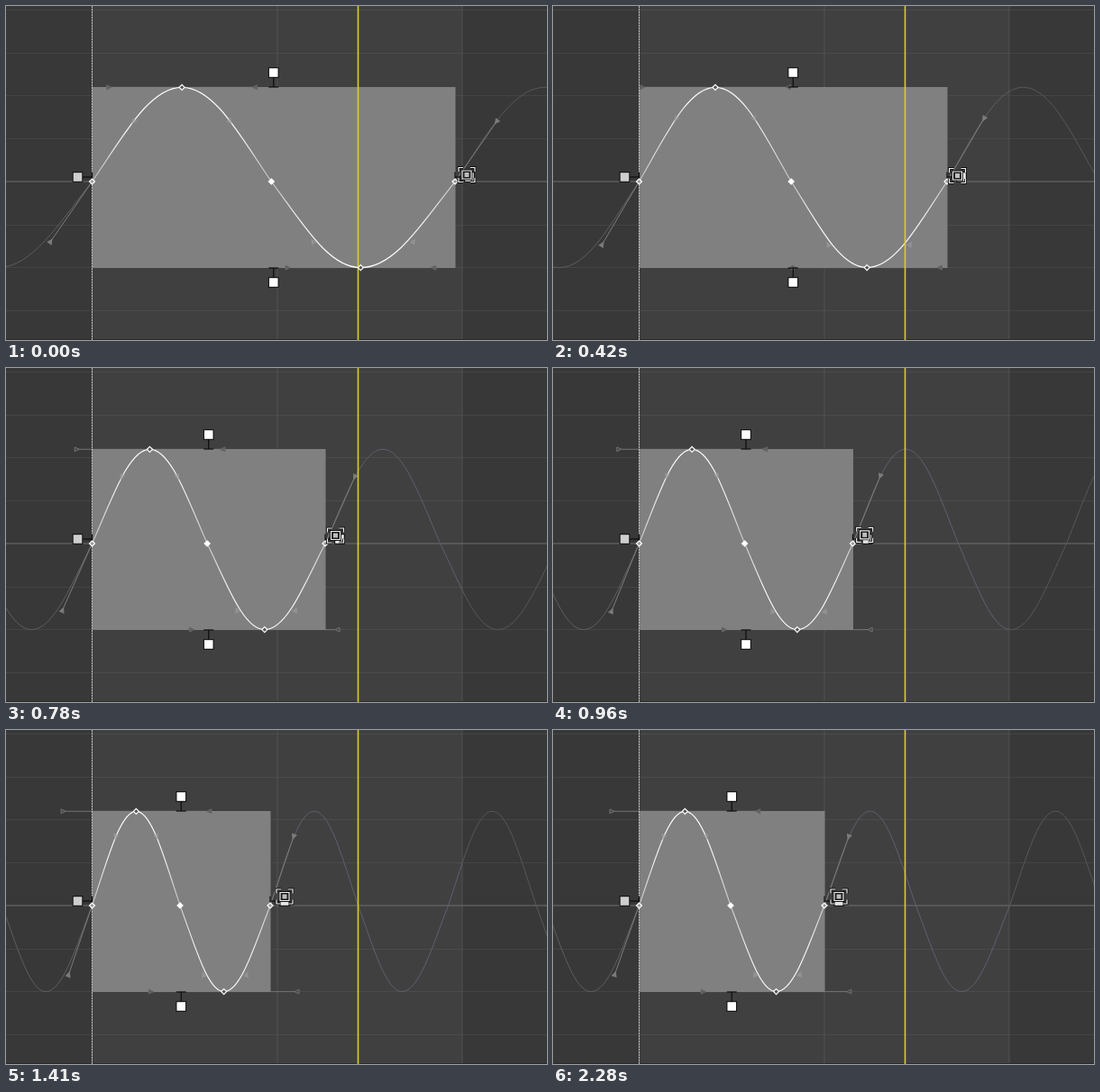
Recreate the animation shown at these times as an HTML page with a canvas. Size 600 by 371 pixels, loop 2.37 s.

```html
<!DOCTYPE html>
<html lang="en">
<head>
<meta charset="utf-8">
<title>Curve editor: scaling a cycle</title>
<style>
  html, body { margin: 0; width: 100%; height: 100%; overflow: hidden; background: #383838; }
  canvas { display: block; }
</style>
</head>
<body>
<canvas id="stage" width="600" height="371"></canvas>
<script>
const c = document.getElementById('stage').getContext('2d');
const LOOP = 2370, LEFT = 95.5, MID = 195, TOP = 90.3, LOW = 290.6, REACH = 81;

// Keys: [ms, right edge of the box, pointer x, pointer y]
const keys = [
  [0, 498, 511, 187.5], [420, 437, 448.5, 188.5], [780, 354, 365.5, 186],
  [1170, 313, 328, 185], [1410, 293, 309, 185], [1740, 293, 309, 185],
  [1950, 301, 316, 185], [2100, 301, 317, 185], [LOOP, 301, 317, 185]
];

// Monotone cubic interpolation through column k
function track(t, k) {
  const secant = i => (keys[i + 1][k] - keys[i][k]) / (keys[i + 1][0] - keys[i][0]);
  const slope = i => {
    if (i === 0) return secant(0);
    if (i === keys.length - 1) return 0;
    const a = secant(i - 1), b = secant(i);
    return a * b > 0 ? 2 * a * b / (a + b) : 0;
  };
  let i = 0;
  while (i < keys.length - 2 && t >= keys[i + 1][0]) i++;
  const h = keys[i + 1][0] - keys[i][0], u = (t - keys[i][0]) / h, v = 1 - u;
  return keys[i][k] * (1 + 2 * u) * v * v + slope(i) * h * u * v * v
       + keys[i + 1][k] * u * u * (3 - 2 * u) - slope(i + 1) * h * u * u * v;
}

function rect(color, x, y, w, h) {
  c.fillStyle = color;
  c.fillRect(x, y, w, h);
}

function line(color, x1, y1, x2, y2, width = 1) {
  c.strokeStyle = color;
  c.lineWidth = width;
  c.beginPath();
  c.moveTo(x1, y1);
  c.lineTo(x2, y2);
  c.stroke();
}

function clipped(x, w, draw) {
  c.save();
  c.beginPath();
  c.rect(x, 0, w, 371);
  c.clip();
  draw();
  c.restore();
}

// One cycle of the wave, w wide, starting at x
function points(x, w) {
  return [[x, MID], [x + 0.2475 * w, TOP], [x + 0.494 * w, MID], [x + 0.74 * w, LOW], [x + w, MID]];
}

function wave(color, x, w, width) {
  const p = points(x, w);
  c.beginPath();
  c.moveTo(...p[0]);
  for (let i = 1; i < 5; i++) {
    const [x1, y1] = p[i - 1], [x2, y2] = p[i], d = x2 - x1, rise = (y2 - y1) * 0.5;
    const outward = i % 2;
    c.bezierCurveTo(x1 + 0.36 * d, outward ? y1 + rise : y1,
                    x2 - 0.36 * d, outward ? y2 : y2 - rise, x2, y2);
  }
  c.strokeStyle = color;
  c.lineWidth = width;
  c.stroke();
}

// White at the extremes, paler around the middle keys
const glow = c.createLinearGradient(0, TOP, 0, LOW);
[[0, 1], [0.25, 0.9], [0.5, 0.55], [0.75, 0.9], [1, 1]]
  .forEach(([at, alpha]) => glow.addColorStop(at, `rgba(255,255,255,${alpha})`));

// Small arrow at the end of a tangent, aimed back at its key
function arrow(x, y, dx, dy, color, fill) {
  c.save();
  c.translate(x + dx, y + dy);
  c.rotate(Math.atan2(-dy, -dx));
  c.beginPath();
  c.moveTo(2.7, 0);
  c.lineTo(-2.3, -2.4);
  c.lineTo(-2.3, 2.4);
  c.closePath();
  c.fillStyle = fill;
  c.fill();
  c.strokeStyle = color;
  c.lineWidth = 1;
  c.stroke();
  c.restore();
}

// Tangent lines show only outside the box; arrows show on both sides
function tangents(p, w, outside) {
  const k = 582 / w, dx = REACH / Math.hypot(1, k), dy = dx * k;
  const steep = outside ? '#7c7c7c' : 'rgba(155,155,155,.6)';
  const flat = outside ? '#737373' : '#626262';
  p.forEach(([x, y], i) => {
    for (const s of [-1, 1]) {
      const level = i % 2;
      const ex = s * (level ? REACH : dx), ey = level ? 0 : (i === 2 ? s : -s) * dy;
      const color = level ? flat : steep;
      if (outside) line(color, x, y, x + ex, y + ey);
      arrow(x, y, ex, ey, color, level && outside ? '#454545' : color);
    }
  });
}

function diamond(x, y, fill) {
  c.beginPath();
  c.moveTo(x, y - 3);
  c.lineTo(x + 3, y);
  c.lineTo(x, y + 3);
  c.lineTo(x - 3, y);
  c.closePath();
  c.fillStyle = fill;
  c.fill();
  c.strokeStyle = '#fff';
  c.lineWidth = 1.2;
  c.stroke();
}

// Scale grip: end bar on the box edge, stem and square
function grip(x, y, dx, dy, fill) {
  line('#0c0c0c', x - 5.5 * dy, y - 5.5 * dx, x + 5.5 * dy, y + 5.5 * dx, 1.2);
  line('#0c0c0c', x, y, x + 11 * dx, y + 11 * dy, 1.2);
  const gx = x + 16 * dx, gy = y + 16 * dy;
  rect('#0c0c0c', gx - 5.8, gy - 5.8, 11.6, 11.6);
  rect(fill, gx - 4.8, gy - 4.8, 9.6, 9.6);
}

function pointer(x, y) {
  const shape = () => {
    c.beginPath();
    for (const sx of [-1, 1]) for (const sy of [-1, 1]) {
      c.moveTo(x + sx * 4, y + sy * 8);
      c.lineTo(x + sx * 9, y + sy * 8);
      c.lineTo(x + sx * 9, y + sy * 3.5);
    }
    c.rect(x - 5, y - 4.5, 10, 9);
    c.stroke();
  };
  c.strokeStyle = '#111';
  c.lineWidth = 3;
  shape();
  c.strokeStyle = '#f2f2f2';
  c.lineWidth = 1.2;
  shape();
  rect('#1a1a1a', x - 4, y - 3.5, 8, 7);
  rect('#bdbdbd', x - 2.5, y - 2.5, 5, 5);
}

function grid() {
  rect('#383838', 0, 0, 600, 371);
  rect('#404040', 95, 0, 411, 371);
  for (const y of [4, 52, 99, 147, 243, 290, 338]) {
    rect('#444', 0, y, 600, 1);
    rect('#4b4b4b', 95, y, 411, 1);
  }
  rect('#505050', 300.5, 0, 1, 371);
  rect('#505050', 505.5, 0, 1, 371);
  rect('#6e6e6e', 0, 194.5, 600, 1);
  rect('#2b2a2a', 0, 370, 600, 1);
}

function draw(t) {
  const right = track(t, 1), w = right - LEFT, p = points(LEFT, w);
  grid();

  clipped(0, LEFT, () => wave('#5e5e5e', LEFT - w, w, 1));
  const repeat = color => {
    for (let x = right; x < 600; x += w) wave(color, x, w, 1);
  };
  clipped(right, Math.max(0, 506 - right), () => repeat('#615f6e'));
  clipped(506, 94, () => repeat('#585858'));
  tangents(p, w, true);

  rect('#808080', LEFT, 90, w + 0.5, 201);
  clipped(LEFT, w, () => {
    wave(glow, LEFT, w, 1.15);
    tangents(p, w, false);
  });
  rect('#707070', 95, 0, 1, 371);
  c.setLineDash([2, 1]);
  line('#c0c0c0', 95.5, 0, 95.5, 371);
  c.setLineDash([]);
  rect('#d8cf2c', 389.7, 0, 1.6, 371);

  const cx = (LEFT + right) / 2;
  grip(cx, 90, 0, -1, '#fff');
  grip(cx, 291, 0, 1, '#fff');
  grip(95.5, 190, -1, 0, '#cecece');
  grip(right, 190, 1, 0, '#e6e6e6');
  p.forEach(([x, y], i) => diamond(x, y, i === 2 ? '#fff' : i % 2 ? '#555' : '#999'));
  pointer(track(t, 2), track(t, 3));
}

function frame(now) {
  const t = now % LOOP;
  draw(Math.floor(t / 30) * 30);
  requestAnimationFrame(frame);
}
draw(0);
requestAnimationFrame(frame);
</script>
</body>
</html>
```
